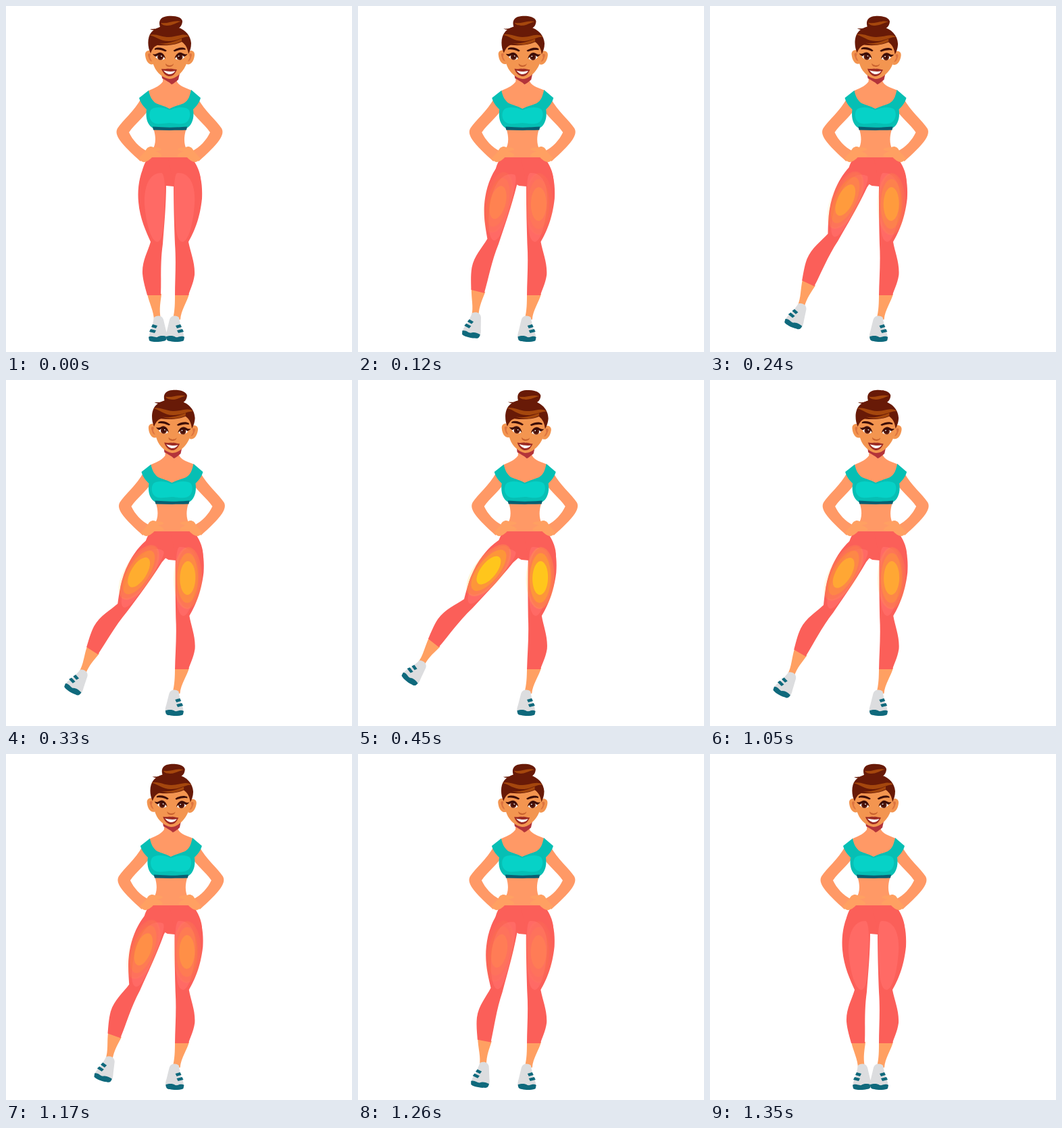
These frames come from a looping animation (512 px wide and 512 px high, 1800 ms). An HTML page:

```html
<!DOCTYPE html>
<html lang="en">
<head>
<meta charset="utf-8">
<title>Side leg raise</title>
<style>
  html, body { margin: 0; width: 100%; height: 100%; overflow: hidden; background: #fff; }
  svg { display: block; width: 100%; height: 100%; }
  .skin { fill: #ff9966; }
  .limb { fill: #ffa062; }
  .face { fill: #f39550; }
  .pants { fill: #fb5f59; }
  .sheen { fill: #ff6a65; }
  .hair { fill: #681a07; }
  .shine { fill: #a5470d; }
  .teal { fill: #0f697c; }
  .ink { fill: #3d0d08; }
</style>
</head>
<body>
<svg viewBox="0 0 512 512">
  <defs>
    <g id="shoe">
      <path fill="#dcdddf" d="M219 461C224 457 231 458 233 464L237 481C239 487 239 492 236 494C230 497 216 498 212 494C210 488 214 481 216 476Z"/>
      <path class="teal" d="M211 490C216 487 220 491 224 490C228 487 234 488 238 489C238 493 237 496 232 496C225 498 214 497 212 495Z"/>
      <path class="teal" d="M217 471L224 473L222 477L215 475ZM214 478L222 480L220 484L212 482Z"/>
    </g>
    <g id="glow">
      <ellipse rx="21" ry="46" fill="#ffcd3c" opacity=".2"/>
      <ellipse rx="17.5" ry="44" fill="#fd7d50"/>
      <ellipse rx="15.5" ry="37" fill="#fd9639"/>
      <ellipse rx="11.5" ry="25" fill="#ffc61c"/>
    </g>
    <g id="arm">
      <path class="skin" d="M200 137C190 155 172 170 165 181C162 186 164 192 168 198C174 207 187 219 199 230L209 215C197 209 187 198 182 187C191 174 203 166 211 153L214 140Z"/>
      <path class="limb" d="M196 226L206 215C209 208 214 207 218 209C224 209 229 210 230 212C229 214 224 214 221 215C227 217 231 220 230 222C226 224 219 222 216 224C212 228 206 233 201 230Z"/>
    </g>
    <g id="ear">
      <path class="face" d="M217 68C212 64 205 66 206 73C207 82 212 88 218 86Z"/>
      <path fill="#dd7440" d="M214 71C210 69 209 72 211 76C212 80 214 82 216 82L213 76Z"/>
    </g>
    <g id="eye">
      <path fill="#fff" d="M221 75C225 70 232 70 235 78C231 81 224 80 221 75Z"/>
      <circle cx="228.5" cy="75.5" r="4.5" fill="#5d1d0e"/>
      <circle cx="228.5" cy="75.5" r="2.2" class="ink"/>
      <circle cx="230" cy="74" r="1" fill="#fff"/>
      <path class="ink" d="M217 71C221 72 222 71 225 69.500C230 67 235 72 236 78C232 73 226 71 222 75C220 74 218 73 217 71Z"/>
      <path class="ink" d="M220 63C225 60 233 62 238 66L236 67.500C230 65 225 64 220 65Z"/>
    </g>
  </defs>

  <g class="lift">
    <path class="limb" d="M209 426L230 426C229 437 226 448 229 463L219 465C219 452 212 440 209 426Z"/>
    <use href="#shoe"/>
    <path class="pants" d="M210 226C198 245 194 268 196 290C198 315 208 335 214 349C210 363 201 378 202 396C203 408 207 420 209 428L229 428C230 405 228 380 232 352C234 325 237 295 237 262L243 226Z"/>
  </g>

  <path class="pants torso" d="M211 223L274 223C284 237 289 250 288 262L248 267L237 266L202 246C202 238 207 229 211 223Z"/>

  <g id="stand">
    <path class="limb" d="M250 426L271 426C268 438 259 450 258 464L247 463C250 450 250 440 250 426Z"/>
    <use href="#shoe" transform="matrix(-1 0 0 1 475 0)"/>
    <path class="pants" d="M274 226C288 243 291 262 290 285C287 315 278 335 270 349C273 365 280 380 279 398C277 412 272 420 270 428L250 428C250 405 252 380 250 352C249 325 248 295 248 262L240 226Z"/>
    <path class="sheen" d="M254 247C270 246 281 262 279 293C277 322 270 349 261 349C253 348 251 332 250 308C249 285 247 248 254 247Z"/>
    <use href="#glow" class="heat" x="266.500" y="293"/>
  </g>

  <g class="lift">
    <path class="sheen" d="M230 247C214 247 204 263 205 293C207 322 215 349 224 349C231 348 233 332 234 308C235 285 237 249 230 247Z"/>
    <use href="#glow" class="heat" x="216" y="293"/>
  </g>

  <g class="torso">
    <path class="skin" d="M233 98L232 112C226 120 217 122 210 126L212 170L219 184C222 195 222 205 216 214L210 224L275 224L268 214C263 205 263 195 266 184L273 170L275 125C266 121 257 119 253 112L253 98Z"/>
    <use href="#arm"/>
    <use href="#arm" transform="matrix(-1 0 0 1 484 0)"/>
    <path fill="#06bfb4" d="M211 125L197 136C199 144 204 149 208 153C206 167 210 177 218 181L267 181C275 177 279 166 277 153C281 149 286 144 288 136L274 124C272 133 270 140 263 144C256 147 250 148 242 152C235 148 229 147 222 144C216 140 213 134 211 125Z"/>
    <path fill="#06d2c7" d="M215 153C222 148 233 150 242 154C251 150 263 148 270 153C275 160 271 171 265 173C257 176 248 173 242 173C236 173 226 176 219 173C212 170 210 159 215 153Z"/>
    <path fill="#075f72" d="M217 178.500C234 180 251 180 268 178.500L267 183.500C251 184 234 184 218 183.500Z"/>
    <path fill="#b3343a" d="M230 100L257 100L255 109C251 112 248 115 245 116C241 112 236 110 231 107Z"/>

    <g id="head">
      <path class="hair" d="M228 31C225 22 229 16 239 15C250 14 259 16 261 22C261 28 258 32 253 34L226 36C221 36 217 36 213 34C219 34 224 34 228 31Z"/>
      <path class="shine" d="M229 25C239 27 249 20 259 23C253 24 247 29 239 29C234 29 231 28 229 25Z"/>
      <use href="#ear"/>
      <use href="#ear" transform="matrix(-1 0 0 1 485 0)"/>
      <path class="face" d="M216 56L269 52C271 68 270 80 266 88C261 99 251 108 242 108C233 107 223 99 219 89C215 80 214 68 216 56Z"/>
      <path class="hair" d="M214 70C209 60 209 46 215 39C222 31 234 28 247 30C263 32 273 42 274 55C274 62 272 67 270 71C269 63 266 57 260 53C250 58 236 59 224 58C218 60 216 65 214 70Z"/>
      <path class="shine" d="M212 43C221 40 230 46 241 46C253 46 263 39 271 45C263 45 253 52 241 52C228 52 222 45 212 43ZM226 55C237 57 249 53 260 48L260 52C250 57 238 59 226 55Z"/>
      <use href="#eye"/>
      <use href="#eye" transform="matrix(-1 0 0 1 485.500 0)"/>
      <path fill="#c9622f" d="M236 85C239 88 240 87 242 88C245 87 246 88 248 85C248 89 244 90 242 90C239 90 236 89 236 85Z"/>
      <path fill="#9d2c24" d="M230 93C236 94 239 92 242 93C246 92 249 94 253 94C250 101 247 104 241 104C236 103 232 99 230 93Z"/>
      <path fill="#fff" d="M233 95.500C239 97 245 97.500 250.500 96C248 100 245 101 241 101C237 100 235 98 233 95.500Z"/>
    </g>
  </g>
</svg>
<script>
  const LOOP = 1800, STEP = 30, STEPS = 15, LOWER = 930;
  const SHIFT = 4.7, KNEEL = 0.023, HEM = 430;
  const all = s => [...document.querySelectorAll(s)];
  const lifts = all('.lift'), torso = all('.torso'), heats = all('.heat');
  const stand = all('#stand'), head = all('#head');
  const setAll = (list, name, value) => list.forEach(el => el.setAttribute(name, value));

  function phase(t) {
    if (t < LOWER) return Math.min(STEPS, Math.floor(t / STEP)) / STEPS;
    return Math.max(0, STEPS - 1 - Math.floor((t - LOWER) / STEP)) / STEPS;
  }

  function draw() {
    const p = phase(performance.now() % LOOP);
    const angle = 38.5 * (1.5 * p - 0.5 * p * p);
    const lean = KNEEL * p; // the standing leg leans about its hem
    setAll(lifts, 'transform', `rotate(${angle} 221 255)`);
    setAll(torso, 'transform', `translate(${SHIFT * p} 0)`);
    setAll(stand, 'transform', `matrix(1 0 ${-lean} 1 ${HEM * lean} 0)`);
    setAll(head, 'transform', `rotate(${3 * p} 242 112)`);
    setAll(heats, 'opacity', p);
    requestAnimationFrame(draw);
  }
  draw();
</script>
</body>
</html>
```
